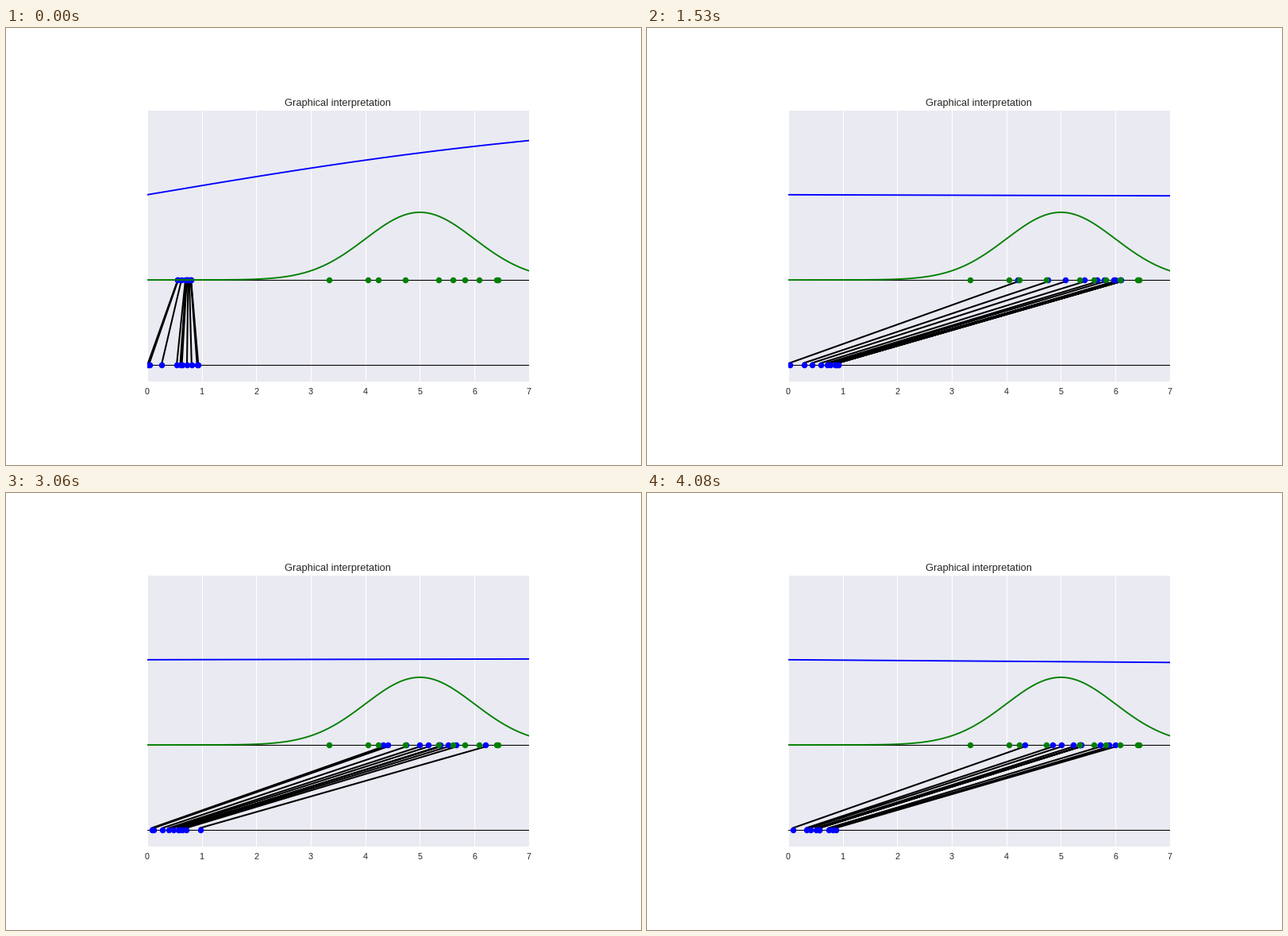
A matplotlib script that plays this animation: 800x550 px, repeating every 4250 ms.

```python
import numpy as np
import matplotlib.pyplot as plt
from matplotlib.animation import FuncAnimation

W, H, DPI = 800, 550, 100
FRAMES, INTERVAL, SAMPLES = 25, 170, 10
LEFT, RIGHT, TOP, BOTTOM = 177.9, 658.8, 103.7, 445.1
PT = 0.776  # plot drawn at 77.6 dpi inside the stage
INK = "0.15"
DATA = [3.335, 4.048, 4.237, 4.725, 5.344, 5.606, 5.831, 6.093, 6.406, 6.428]

plt.rcParams["font.family"] = "Liberation Sans"


def generator(i, z):
    """Map noise to samples; training jumps quickly, then settles."""
    offset = np.interp(i, [0, 3, 7], [0.545, 4.27, 4.15])
    slope = np.interp(i, [0, 3, 7], [0.28, 2.19, 2.12])
    return offset + slope * z


def discriminator(i, x):
    """Twice a sigmoid that flattens and then wobbles around one."""
    end = np.interp(i, [0, 3, 7, 16, 20, 24],
                    [1.53, -0.08, -0.017, -0.01, 0.066, -0.054])
    return 2 / (1 + np.exp(-(0.01 + (end - 0.01) * x / 7)))


fig = plt.figure(figsize=(W / DPI, H / DPI), dpi=DPI, facecolor="white")
ax = fig.add_axes([LEFT / W, 1 - BOTTOM / H, (RIGHT - LEFT) / W, (BOTTOM - TOP) / H],
                  facecolor="#EAEAF2")
ax.set(xlim=(0, 7), ylim=(-1.2, 2), xticks=range(8), yticks=[])
ax.set_axisbelow(True)
ax.grid(axis="x", color="white", lw=PT)
ax.spines[:].set_visible(False)
ax.tick_params(axis="x", length=0, pad=7 * PT, labelsize=10 * PT, labelcolor=INK)
ax.set_title("Graphical interpretation", fontsize=12 * PT, color=INK, pad=5.5 * PT, y=1)


def curve(color, order, width=1.75):
    return ax.plot([], [], color=color, lw=width * PT, zorder=order)[0]


def dots(color, order):
    return ax.plot([], [], "o", color=color, ms=7 * PT, mew=0, zorder=order)[0]


x = np.linspace(0, 7, 200)
for y in (0, -1):
    curve("black", 2, 1).set_data([0, 7], [y, y])
links = curve("black", 3, 1.9)
decision = curve("blue", 4)
inputs = dots("blue", 5)
outputs = dots("blue", 5)
curve("green", 6).set_data(x, 2 * np.exp(-(x - 5) ** 2 / 2) / np.sqrt(2 * np.pi))
dots("green", 7).set_data(DATA, np.zeros(len(DATA)))


def update(i):
    z = np.random.default_rng(i).random(SAMPLES)
    g = generator(i, z)
    inputs.set_data(z, np.full(SAMPLES, -1))
    outputs.set_data(g, np.zeros(SAMPLES))
    gap = np.full(SAMPLES, np.nan)
    links.set_data(np.column_stack([z, g, gap]).ravel(),
                   np.tile([-0.98, -0.02, np.nan], SAMPLES))
    decision.set_data(x, discriminator(i, x))
    return links, decision, inputs, outputs


anim = FuncAnimation(fig, update, frames=FRAMES, interval=INTERVAL,
                     repeat=True, repeat_delay=0, blit=False)
plt.show()
```
